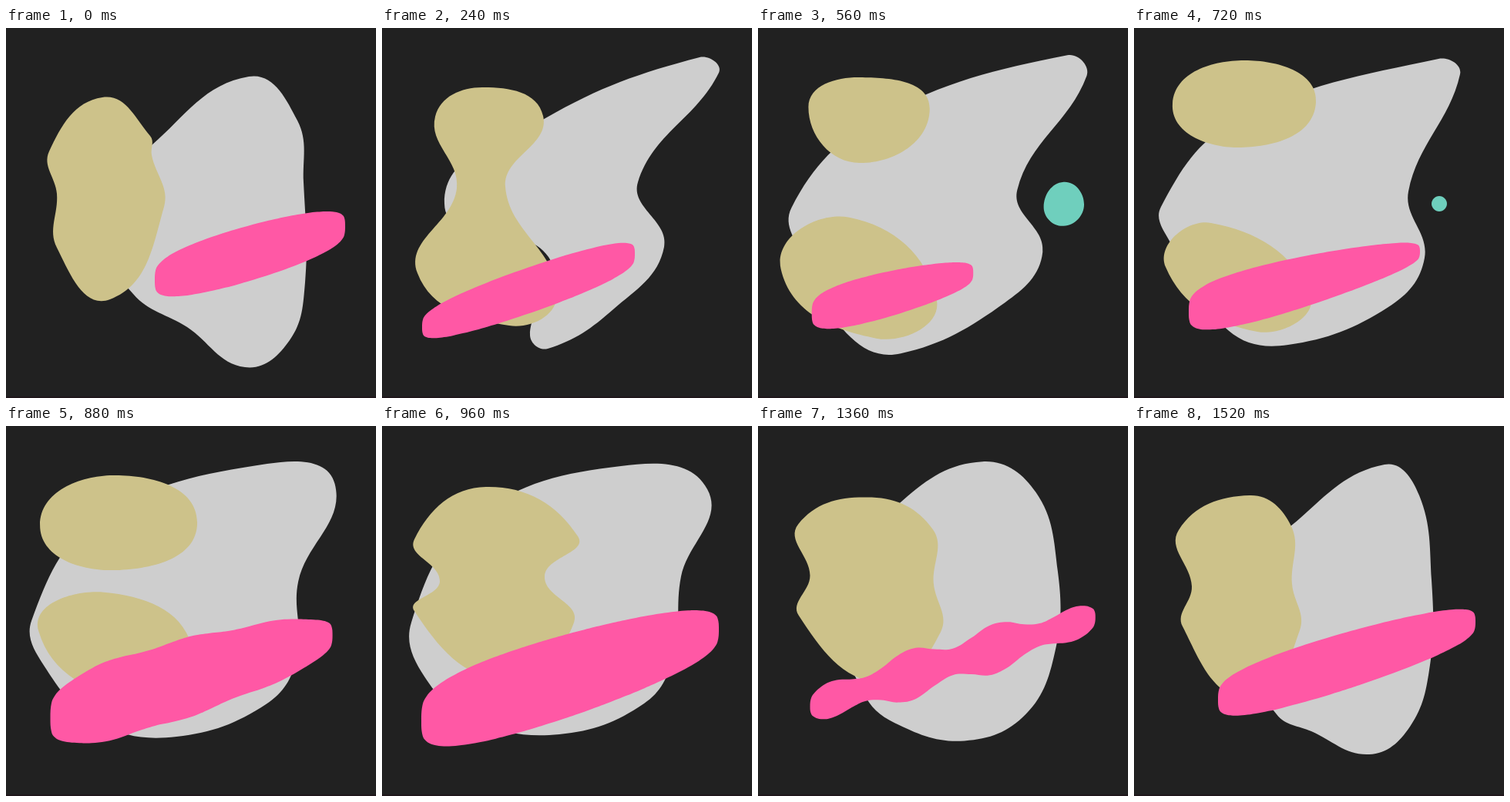
Animation of 480x480 px, one loop 1600 ms. Source, as an HTML page:

```html
<!DOCTYPE html>
<html lang="en">
<head>
<meta charset="utf-8">
<title>Blobs</title>
<style>
  html, body { margin: 0; width: 100%; height: 100%; overflow: hidden; background: #212121; }
  svg { display: block; width: 100%; height: 100%; }
</style>
</head>
<body>
<svg id="stage" viewBox="0 0 480 480">
  <rect width="480" height="480" fill="#212121"/>
  <rect y="478" width="480" height="2" fill="#1f171b"/>
</svg>
<script>
const STEP = 80, COUNT = 20;
const GREY = '#cecece', TAN = '#cdc28a', PINK = '#ff58a5', TEAL = '#6fcfbd';
const stage = document.getElementById('stage');
const tracks = [];

// A blob is visible from step `from` up to `to`; steps past COUNT wrap around.
function blob(fill, from, to, poses, shape = pairs) {
  const path = document.createElementNS('http://www.w3.org/2000/svg', 'path');
  path.setAttribute('fill', fill);
  stage.append(path);
  const keys = Object.keys(poses).map(t => ({ t: +t, p: poses[t].split(/[ ,]/).map(Number) }));
  tracks.push({ path, from, to, keys, shape });
}

// Pose as a few outline points.
function pairs(p) {
  return Array.from({ length: p.length / 2 }, (_, i) => [p[2 * i], p[2 * i + 1]]);
}

// Pose as a slanted bar: both ends, half height, taper to the right, waviness.
function ribbon([x0, y0, x1, y1, half, taper, wave]) {
  const n = 48;
  return Array.from({ length: n }, (_, i) => {
    const a = 2 * Math.PI * i / n;
    const s = -Math.cos(a), u = (1 + s) / 2, side = -Math.sin(a);
    const ripple = 1 - wave * Math.cos(Math.PI * 3.3 * s);
    const h = half * Math.abs(side) ** 0.55 * (1 - taper * s) * ripple;
    return [x0 + (x1 - x0) * u, y0 + (y1 - y0) * u + Math.sign(side) * h];
  });
}

const greyStart = '315,63 378,120 386,200 388,330 368,405 310,440 235,388 165,345 110,240 189,152';
blob(GREY, 0, 20, {
  0: greyStart,
  3: '412,38 437,58 332,200 366,284 300,365 215,416 192,398 216,297 81,228 212,117',
  5: '398,33 431,66 322,205 362,283 310,352 180,430 129,408 100,330 57,236 190,110',
  9: '395,40 423,60 356,212 377,298 330,362 200,411 122,392 47,278 35,232 130,122',
  12: '310,52 422,82 388,195 378,300 340,360 230,400 120,382 55,325 38,255 120,118',
  15: '265,46 362,88 391,180 388,275 340,362 235,396 130,375 85,315 80,200 155,85',
  19: '325,50 370,90 386,200 384,310 358,390 305,426 230,396 185,374 110,240 215,120',
  20: greyStart
});

blob(TEAL, 4, 10, {
  4: '397,206 417,228 397,250 377,228',
  5: '397,187 435,229 397,270 360,235',
  9: '396,218 406,228 396,238 386,228'
});

// Joined tan body (top, right, waist, right, bottom, left, waist, left), then its split halves.
blob(TAN, 12, 26, {
  12: '135,79 254,143 211,195 249,255 160,330 42,240 75,201 42,147',
  15: '140,93 245,140 241,195 254,262 165,318 44,238 61,185 46,128',
  19: '150,90 204,130 205,205 215,265 150,354 63,260 75,208 58,135',
  20: '125,90 187,140 189,165 205,232 135,352 66,285 66,215 56,160',
  23: '130,77 209,114 160,206 227,345 165,386 46,318 97,208 69,115',
  25: '130,82 214,118 138,200 238,360 160,403 31,312 124,210 74,108'
});
blob(TAN, 6, 12, {
  6: '125,79 216,112 130,190 74,108',
  9: '143,42 236,97 135,155 50,98',
  12: '135,79 254,143 140,208 42,147'
});
blob(TAN, 6, 12, {
  6: '132,238 235,350 150,404 23,310',
  9: '100,253 228,345 160,394 41,310',
  12: '145,193 249,250 170,330 42,240'
});

blob(PINK, 5, 25, {
  5: '65,375 176,348 28 0 0',
  9: '71,368 371,290 33 .3 0',
  12: '51,382 437,264 54 .13 0',
  15: '47,368 433,246 20 0 .55',
  19: '109,355 443,254 37 .1 0',
  20: '193,327 440,257 36 .05 0',
  23: '52,388 328,293 30 0 0',
  24: '58,382 316,303 16 .4 .4'
}, ribbon);
for (const drop of ['198,334 235,322 10 -.1 0', '256,321 268,321 2 0 0', '293,320 299,318 2 0 0']) {
  blob(PINK, 5, 6, { 5: drop }, ribbon);
}

// Cubic Hermite blend between the poses around time t.
function poseAt(keys, t) {
  const last = keys.length - 1;
  const i = keys.findLastIndex(k => k.t <= t);
  if (i === last) return keys[last].p;
  const a = keys[i], b = keys[i + 1];
  const before = keys[Math.max(i - 1, 0)], after = keys[Math.min(i + 2, last)];
  const span = b.t - a.t, u = (t - a.t) / span;
  const s = u * u * (3 - 2 * u);
  const inA = u * (1 - u) * (1 - u) * span, inB = u * u * (u - 1) * span;
  return a.p.map((v, j) => v + (b.p[j] - v) * s
    + inA * (b.p[j] - before.p[j]) / (b.t - before.t)
    + inB * (after.p[j] - v) / (after.t - a.t));
}

// Closed smooth curve; handles run parallel to the neighbours and scale with the chord.
function outline(points) {
  const n = points.length;
  const at = i => points[(i + n) % n];
  const handle = (i, reach) => {
    const [x, y] = at(i), [px, py] = at(i - 1), [nx, ny] = at(i + 1);
    const k = reach / (Math.hypot(nx - px, ny - py) || 1);
    return [(x + k * (nx - px)).toFixed(2), (y + k * (ny - py)).toFixed(2)];
  };
  let d = 'M' + at(0);
  for (let i = 0; i < n; i++) {
    const [x, y] = at(i), [nx, ny] = at(i + 1);
    const reach = 0.38 * Math.hypot(nx - x, ny - y);
    d += `C${handle(i, reach)} ${handle(i + 1, -reach)} ${at(i + 1)}`;
  }
  return d + 'Z';
}

let shown = -1;
function draw(now) {
  const step = Math.floor(now / STEP) % COUNT;
  if (step !== shown) {
    shown = step;
    for (const { path, from, to, keys, shape } of tracks) {
      const t = step < from ? step + COUNT : step;
      path.setAttribute('d', t < to ? outline(shape(poseAt(keys, t))) : '');
    }
  }
  requestAnimationFrame(draw);
}
draw(0);
</script>
</body>
</html>
```
